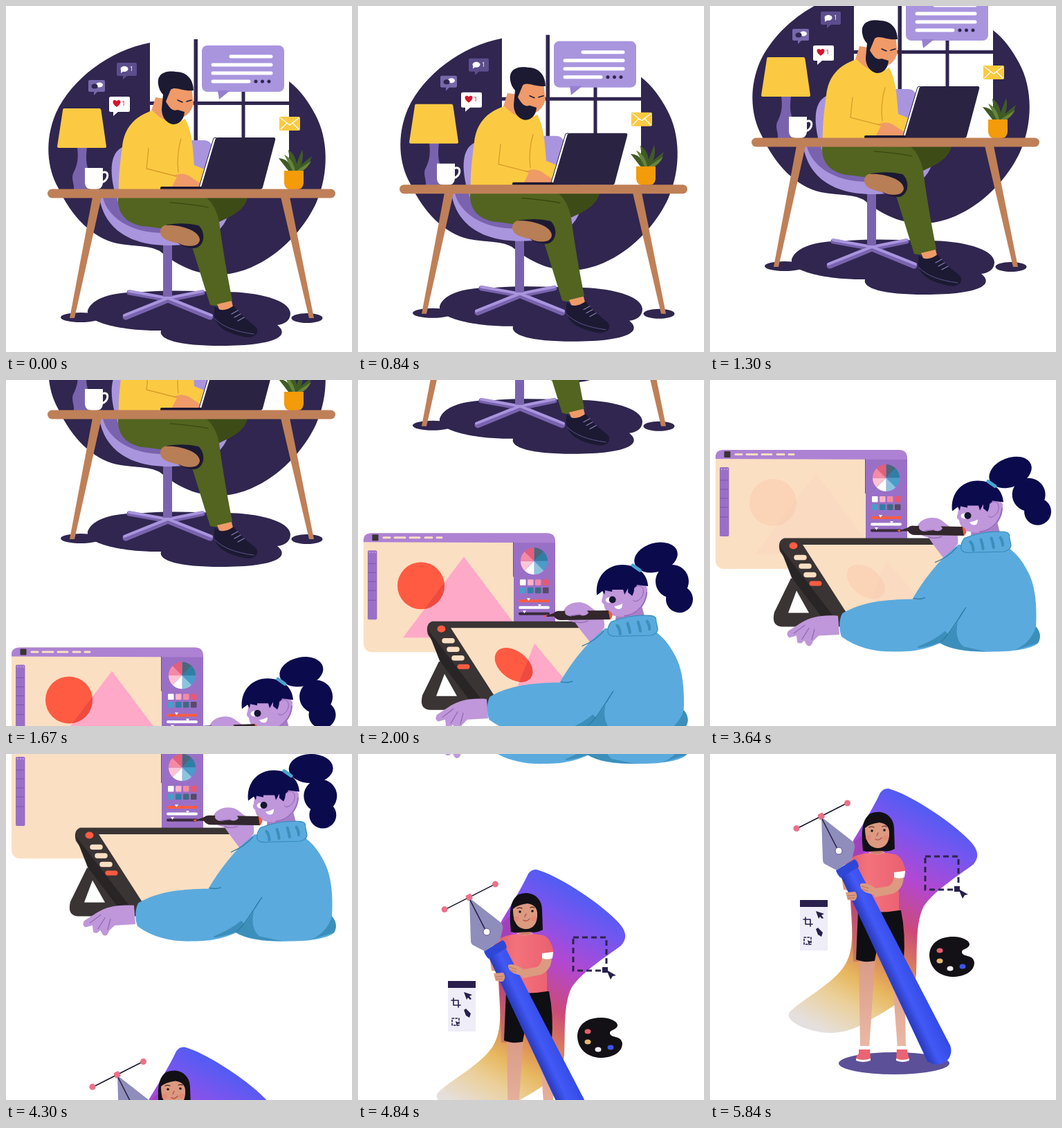
These frames come from a looping animation (500x500 px, 8000 ms). An HTML page:

```html
<!DOCTYPE html>
<html lang="en">
<head>
<meta charset="utf-8">
<title>Creative work</title>
<style>
html, body { margin: 0; width: 100%; height: 100%; overflow: hidden; background: #fff; }
svg { display: block; width: 100vw; height: 100vh; }
text { font: 8.5px Roboto, Arial, sans-serif; }
.ink { fill: #30264f; }
.dark { fill: #1c1933; }
.screen { fill: #2a2342; }
.lilac { fill: #a995de; }
.plum { fill: #7963ae; }
.gold { fill: #fbca42; }
.skin { fill: #ef9a68; }
.wood { fill: #bf8058; }
.pants { fill: #52641f; }
.violet { fill: #bf97da; }
.cream { fill: #fbdfc2; }
.hair { fill: #0b0a4d; }
.knit { fill: #5aaade; }
.coal { fill: #3a3434; }
.red { fill: #ff5b42; }
.pink { fill: #ffa9c8; }
.deep { fill: #281f4d; }
.face { fill: #dc9a80; }
.line { fill: none; stroke-linecap: round; stroke-linejoin: round; }
</style>
</head>
<body>
<svg viewBox="0 0 500 500">
<defs>
  <linearGradient id="sky" gradientUnits="userSpaceOnUse" x1="325" y1="75" x2="150" y2="395">
    <stop offset="0" stop-color="#4a5df4"/><stop offset=".14" stop-color="#7a55ee"/>
    <stop offset=".3" stop-color="#b248d2"/><stop offset=".48" stop-color="#cb4a78"/>
    <stop offset=".64" stop-color="#dc8a55"/><stop offset=".75" stop-color="#e7b85f"/>
    <stop offset=".85" stop-color="#ebcf98"/><stop offset="1" stop-color="#e5e0e0"/>
  </linearGradient>
  <linearGradient id="barrel" gradientUnits="userSpaceOnUse" x1="254" y1="310" x2="288" y2="294">
    <stop offset="0" stop-color="#2c3ec4"/><stop offset=".35" stop-color="#4259f6"/><stop offset="1" stop-color="#3349e6"/>
  </linearGradient>
  <linearGradient id="leg" x2="0" y2="1">
    <stop offset="0" stop-color="#d99a84"/><stop offset="1" stop-color="#eab9a6"/>
  </linearGradient>
  <linearGradient id="shirt">
    <stop offset="0" stop-color="#d9536a"/><stop offset=".4" stop-color="#f4727c"/><stop offset="1" stop-color="#e9606f"/>
  </linearGradient>
  <clipPath id="canvas"><path d="M8 125H225V284H8Z"/></clipPath>
  <clipPath id="tri1"><path d="M153 146L65 263H241Z"/></clipPath>
  <clipPath id="tri2"><path d="M255 265L231 326H306Z"/></clipPath>
</defs>
<g id="roll">

<!-- desk -->
<g>
  <path class="ink" d="M208 53C150 64 95 105 72 155C55 195 60 235 75 262C95 305 125 335 160 343C185 348 205 345 222 354C245 372 270 389 312 388C370 385 425 335 448 285C468 240 465 190 447 157C437 138 425 121 409 109V53Z"/>
  <path fill="#fff" d="M208 20H409V268H208Z"/>
  <path class="ink" d="M271.500 48h5.500v220h-5.500zM340.500 122h5v80h-5zM208 138h201v5h-201z"/>
  <g class="lilac">
    <rect x="283" y="57" width="119" height="67" rx="8"/>
    <path fill="#9680cf" d="M306 122H324L308 135Z"/>
  </g>
  <path class="line" stroke="#fff" stroke-width="5" d="M325 73H383M299 85H383M299 97H383M299 109H351"/>
  <path class="line" stroke="#30264f" stroke-width="5" d="M361 109h0M370.500 109h0M380 109h0"/>
  <g fill="#5c4d8c">
    <path d="M162 82H187Q189 82 189 84V99Q189 101 187 101H175L169 106V101H162Q160 101 160 99V84Q160 82 162 82Z"/>
    <path fill="#7768ab" d="M121 107H141Q143 107 143 109V122Q143 124 141 124H132L127 129V124H121Q119 124 119 122V109Q119 107 121 107Z"/>
  </g>
  <g fill="#fff">
    <ellipse cx="171" cy="91" rx="5.500" ry="4"/><path d="M166 92v5l4-3z"/>
    <ellipse cx="135" cy="114" rx="5" ry="3.500"/>
    <ellipse class="ink" cx="128" cy="116" rx="4.500" ry="3.500"/>
    <text x="179" y="94">1</text>
    <path d="M152 131H177Q179 131 179 133V151Q179 153 177 153H162L155 159V153H151Q149 153 149 151V133Q149 131 152 131Z"/>
  </g>
  <path fill="#d8122c" d="M160 146C150 139 156 133 160 137.500C164 133 170 139 160 146Z"/>
  <text x="167.500" y="144" fill="#d8122c" font-weight="700">1</text>
  <rect class="gold" x="395" y="160" width="30" height="20" rx="2"/>
  <path class="line" stroke="#fff" stroke-width="1.200" d="M397 162L410 172L423 162M397 178L406 169M423 178L414 169"/>

  <path class="plum" d="M103 204H117C115 222 116 230 121 242C124 252 118 258 119 266H98C99 257 94 250 97 242C103 230 105 222 103 204Z"/>
  <path class="gold" d="M84 148H135Q137 148 137.500 151L145 203Q145 205 143 205H76Q74 205 74 203L82 151Q82 148 84 148Z"/>
  <path class="line" stroke="#fff" stroke-width="3" d="M139 241C150 236 149 253 138 255"/>
  <path fill="#fff" d="M114 234H140V256Q139 265 130 265H124Q115 265 114 256Z"/>

  <g class="ink">
    <path d="M118 440C125 420 160 413 190 414C230 410 270 412 310 413C360 412 410 424 411 444C411 455 402 460 392 461C410 475 395 491 310 491C250 491 220 482 224 469C180 470 115 460 118 440Z"/>
    <ellipse cx="108" cy="450" rx="29" ry="7"/><ellipse cx="435" cy="451" rx="22.500" ry="7"/>
  </g>
  <path class="lilac" d="M157 268C150 240 150 213 168 204L260 194H286Q298 194 300 210L322 268Z"/>
  <path class="line" stroke="#7963ae" stroke-width="7" d="M234 424L178 414M236 424L284 414"/>
  <path class="line" stroke="#7963ae" stroke-width="9" d="M234 424L173 449M234 424L295 449"/>
  <path class="line" stroke="#a995de" stroke-width="4" d="M178 412L234 422L284 412M171 447L234 422L297 447"/>
  <path class="plum" d="M227 344H240V420H227Z"/>
  <path class="lilac" d="M135 277C140 310 165 346 235 346C285 346 312 330 322 300L326 277Z"/>
  <path class="plum" d="M140 277C147 305 180 330 235 328L228 320C190 318 165 300 160 277Z"/>

  <path class="skin" d="M216 132L208 158L240 170L236 135Z"/>
  <path class="gold" d="M212 151C186 159 171 176 168 203C164 232 162 255 163 272H286L287 236L272 230C270 200 268 180 259 163C245 172 225 167 212 151Z"/>
  <path class="skin" d="M238 247Q254 239 264 245L282 257V265H228Z"/>
  <path class="gold" d="M190 190C185 215 180 240 195 265H238L247 247L206 236Z"/>
  <path class="line" stroke="#d99a2c" stroke-width="1.300" d="M206 206L203 235L246 246M253 192Q246 215 249 240"/>
  <path class="skin" d="M228 115H268L271 142Q265 160 250 162L229 154Z"/>
  <path class="dark" d="M220 113C218 98 230 93 245 95C262 95 271 107 271 122C255 124 245 115 238 121L231 138C236 147 241 153 248 150L258 153C257 165 250 171 241 171C231 169 225 160 225 149L227 128Q221 122 220 113Z"/>
  <path class="line" stroke="#1c1933" stroke-width="1.500" d="M248 136L255 139M261 138L268 136"/>

  <path fill="#3d4c17" d="M270 277H349C345 294 328 303 308 312Z"/>
  <path class="pants" d="M162 277H290Q304 290 308 312C313 350 320 390 327 425Q312 437 295 432L268 345C255 323 225 321 196 318C173 313 161 300 162 277Z"/>
  <path class="line" stroke="#35420f" stroke-width="1.200" d="M237 284Q275 287 292 291"/>
  <path class="dark" d="M232 316Q258 312 278 317C289 326 288 348 272 350Q255 349 248 342Z"/>
  <path fill="#b87e55" d="M229 317C245 315 278 322 280 337C280 350 258 348 250 343C240 341 222 338 223 325Q224 319 229 317Z"/>
  <path class="skin" d="M305 431L326 426L330 443L310 443Z"/>
  <path class="dark" d="M302 434Q312 445 329 433C339 448 352 455 362 465C367 475 355 481 344 478C320 473 295 463 302 434Z"/>
  <path class="line" stroke="#8b83b5" stroke-width="1.200" d="M326 445l9-5M330 450l9-5M335 455l9-5"/>
  <path class="line" stroke="#5d5588" stroke-width="1" d="M302 452Q318 469 358 474"/>

  <path fill="#fff" stroke="#30264f" d="M304 190L300 191L278 265H290Z"/>
  <path class="screen" d="M307 190H387Q390 190 389 194L371 262Q370 265 367 265H281L302 194Q303 190 307 190Z"/>
  <rect class="dark" x="223" y="261" width="60" height="5" rx="2"/>
  <path fill="#3f5b26" d="M408 238L394 220Q405 220 411 230L408 208Q418 214 420 228L428 207Q431 220 426 230L442 217Q438 232 427 238Z"/>
  <path fill="#67843a" d="M414 238L402 215Q414 220 418 238ZM420 238L441 224Q435 236 426 239Z"/>
  <path fill="#f39b08" d="M402 238H430V256Q429 265 421 265H411Q403 265 402 256Z"/>
  <path class="wood" d="M125 276H138L99 451H92ZM397 276H410L445 451H438Z"/>
  <rect class="wood" x="60" y="264.500" width="416" height="13" rx="6.500"/>
</g>

<!-- tablet artist -->
<g transform="translate(0 500)">
  <g id="monitor">
    <rect class="cream" x="8" y="112" width="277" height="172" rx="12"/>
    <path fill="#9a70c6" d="M225 125H285V272Q285 284 273 284H225Z"/>
    <path fill="#ad82d3" d="M8 125V122Q8 112 20 112H273Q285 112 285 124V126Z"/>
    <path fill="#6d4b96" d="M224 125h1v50h-1z"/>
    <rect class="coal" x="20.500" y="114" width="9" height="9" rx="1"/>
    <path class="line" stroke="#fbdfc2" stroke-width="3" d="M37 118.500h9M53 118.500h15M75 118.500h14M97 118.500h10M114 118.500h7"/>
    <rect fill="#9a70c6" x="14" y="137" width="13.500" height="100" rx="2"/>
    <path class="line" stroke="#c9a7e6" stroke-width="2" stroke-dasharray="0 4" d="M17 140h10"/>
    <path stroke="#7b55a8" d="M15 156h11M15 169h11M15 182h11M15 195h11M15 209h11"/>
    <g class="art" clip-path="url(#canvas)">
      <path class="pink" d="M153 146L65 263H241Z"/>
      <circle class="red" cx="91" cy="188" r="34"/>
      <circle fill="#ee4a40" cx="91" cy="188" r="34" clip-path="url(#tri1)"/>
    </g>
    <g id="wheel" transform="translate(254.500 152.500)"></g>
    <g id="swatches"></g>
    <path class="line" stroke="#ff5b42" stroke-width="4" d="M234 210H275"/>
    <path class="line" stroke="#fff" stroke-width="4" d="M234 219.500H275"/>
    <path class="line" stroke="#3a2a3c" stroke-width="4" d="M234 228.500H275"/>
    <path fill="#fff" d="M244 206h5l-2.500 4zM260 215h5l-2.500 4zM238 224h5l-2.500 4z"/>
  </g>
  <path class="coal" d="M117 291L93 340Q88 360 104 361H192L155 296Z"/>
  <path fill="#fff" d="M125 309L113 341H143Z"/>
  <path class="coal" d="M107 233H350L300 360H180Q168 352 162 340L101 252Q97 237 107 233Z"/>
  <path fill="#292425" d="M100 244L118 290L165 352Q175 362 188 360L180 348Z"/>
  <path class="cream" d="M134 242.500H354L300 345L196 339Z"/>
  <g class="art">
    <path class="pink" d="M255 265L231 326H306Z"/>
    <ellipse class="red" cx="225" cy="296" rx="31" ry="20" transform="rotate(38 225 296)"/>
    <g clip-path="url(#tri2)"><ellipse fill="#ee4a40" cx="225" cy="296" rx="31" ry="20" transform="rotate(38 225 296)"/></g>
  </g>
  <ellipse class="red" cx="120.500" cy="244" rx="6" ry="5"/>
  <path class="line" stroke="#fbdfc2" stroke-width="7.500" d="M125 261H136M132 273.500H143M139 286H150"/>
  <path class="line" stroke="#ff5b42" stroke-width="7" d="M147 298.500H158"/>
  <g id="palm">
    <path class="violet" d="M190 345C165 343 150 348 138 356L118 371Q114 379 120 382L130 379L131 390Q136 395 141 387L145 395Q151 400 154 388L162 379L192 377Z"/>
    <path class="line" stroke="#8d65b0" stroke-width="1.200" d="M142 361L126 375M148 366L138 385M156 368L152 386"/>
  </g>
  <g id="tail" class="hair">
    <ellipse cx="405" cy="139" rx="32" ry="21" transform="rotate(-24 405 139)"/>
    <circle cx="433" cy="170" r="24"/><circle cx="447" cy="194" r="19.500"/>
  </g>
  <g id="head">
    <path fill="#a77fc6" d="M354 222L352 250H400L390 212Z"/>
    <path class="violet" d="M336 188L334 204Q331 210 336 213Q338 230 360 231C384 232 400 214 399 190L392 180Z"/>
    <path class="line" stroke="#9a6dc0" stroke-width="2" d="M366 230C384 228 397 213 398 196"/>
    <path class="hair" d="M326 200C323 174 340 156 363 156C386 156 399 170 400 187L384 185L377 201L371 196V190L366 199L364 192H348V195L338 193L337 199L334 194Z"/>
    <path class="line" stroke="#4aa3cf" stroke-width="5" d="M378 157L388 164"/>
    <path class="violet" stroke="#8d65b0" d="M380 190C390 180 398 193 390 204Q382 212 378 207"/>
    <ellipse fill="#fff" cx="344" cy="207" rx="5.500" ry="4"/><circle fill="#171532" cx="348.500" cy="206.500" r="5"/>
    <path fill="#fff" d="M351 216Q358 215 363 212Q363 221 357 220Q353 220 351 216Z"/>
  </g>
  <g id="hand">
    <path class="violet" d="M285 232C286 220 298 213 311 213.500C321 214 326 222 336 224Q346 228 347 246L332 272L313 253L304 243Q288 242 285 232Z"/>
    <path fill="#32272c" d="M258 240L272 233Q275 229 281 229L350 220.500Q357 224 354 233L284 242Q277 243 273 238Z"/>
    <path class="red" d="M350 220.500Q361 224 354 233.500ZM257 239l5-2v4z"/>
    <path class="violet" d="M288 228Q300 214 313 218L322 227Q318 234 309 231L297 235Q287 235 288 228Z"/>
    <path class="line" stroke="#8d65b0" stroke-width="1.200" d="M297 234L310 231M304 242Q314 244 322 239"/>
  </g>
  <g id="body">
    <path class="knit" d="M350 246C322 268 302 297 288 323C250 323 215 327 188 343C183 352 185 369 189 376C212 392 240 398 270 397C300 397 315 392 332 385C350 395 375 398 410 397C442 397 468 392 474 384C479 375 473 367 469 362C469 330 464 303 453 285C444 269 435 259 422 250Z"/>
    <path fill="#3b8fba" d="M366 335C352 350 350 378 366 390L400 397Q350 396 332 385Q350 368 366 335ZM300 390Q325 380 338 368L346 376Q330 388 300 392ZM469 362Q479 372 473 385L440 395Q463 385 469 362Z"/>
    <path class="line" stroke="#2f7ba5" stroke-width="1.300" d="M332 384C345 372 352 357 366 335M290 322Q300 324 306 321M318 271Q336 264 348 250"/>
    <path class="knit" stroke="#3b8fba" stroke-width="1.300" d="M358 237Q385 226 415 228Q424 229 423 236L426 247Q426 254 416 256L372 257Q354 259 354 250Q353 244 358 237Z"/>
    <path class="line" stroke="#3b8fba" stroke-width="4" d="M367 242Q371 246 372 254M382 239Q385 246 386 252M397 237Q400 244 401 250M410 236Q414 242 414 247"/>
  </g>
</g>

<!-- pen holder -->
<g transform="translate(0 1000)">
  <ellipse fill="#5c5099" cx="266" cy="447" rx="80" ry="16"/>
  <path fill="url(#sky)" d="M258 50C285 57 345 94 374 124C388 138 390 149 380 160C355 178 322 200 309 220C296 245 300 285 298 318C296 350 260 368 225 388C200 403 175 406 150 400C130 395 108 384 115 373C130 357 172 335 190 312C208 290 206 262 204 230C202 190 200 150 207 125C216 110 236 78 246 56Q251 49 258 50Z"/>
  <path fill="#8b2b85" opacity=".3" d="M222 116L208 127Q202 160 205 230L207 300H222Z"/>
  <path fill="url(#leg)" d="M215 292H239L230 425H217ZM261 292H281L283 425H271Z"/>
  <path fill="#0f0e13" d="M214 226H276Q283 260 280 298Q262 303 255 298L245 262L238 299Q222 302 211 297Z"/>
  <g fill="#ea6474">
    <path d="M215 425H231L232 442Q221 447 211 442Q211 436 215 433ZM270 425H284L288 441Q277 446 269 442Z"/>
    <path fill="#fff" d="M215 422h16v5h-16zM269 422h15v5h-15zM211 440q10 4 21 0v3q-11 4-21 0zM269 440q9 4 19 0v3q-10 4-19 0z"/>
  </g>
  <path class="face" d="M190 176L208 176L206 198L193 196Z"/>
  <path fill="url(#shirt)" d="M214 146Q240 139 268 145Q281 151 283 174L266 178L273 200V226Q245 231 214 227V180L190 180Q192 152 214 146Z"/>
  <path class="face" d="M266 177L280 178Q279 196 264 202L238 207L234 195L258 191Q265 187 266 177Z"/>
  <path fill="#fff" d="M266 171l16-2-1 9q-8 3-15 0zM229 142h24q-12 5-24 0z"/>
  <path fill="#c87f69" d="M232 128H250V143Q241 146 232 143Z"/>
  <path fill="#121015" d="M221 140C219 115 218 95 232 86C250 79 266 90 266 108L267 137Q258 142 250 140L226 141Z"/>
  <path class="face" d="M224 107Q230 101 245 99Q258 101 259 112C260 128 253 136 242 136C230 135 224 126 224 107Z"/>
  <circle fill="#ea8075" opacity=".6" cx="229" cy="121" r="4"/><circle fill="#ea8075" opacity=".6" cx="254" cy="121" r="4"/>
  <g fill="#221719"><circle cx="234" cy="111" r="1.800"/><circle cx="252" cy="110" r="1.800"/></g>
  <path class="line" stroke="#4a2a25" stroke-width="1.200" d="M230 106q4-2 7 0M249 105q4-2 6 0"/>
  <path class="line" stroke="#b8514d" stroke-width="1.400" d="M239 123q5 3 9-2M243 114l-2 4"/>

  <path fill="url(#barrel)" d="M189 177L213 163L347 421C354 441 333 457 314 444Z"/>
  <path fill="#2f47d6" d="M182 168L209 152Q214 155 215 163L189 179Q184 175 182 168Z"/>
  <path fill="#8f8dbc" d="M161 91L207 127Q210 131 209 136L205 153L183 168L166 159Q163 157 163 153Z"/>
  <path class="line" stroke="#231d3c" stroke-width="1.500" d="M162 94L184 137"/>
  <circle fill="#fff" stroke="#5f5b8b" cx="186" cy="140" r="5"/>
  <path class="face" d="M217 188Q225 184 239 194L242 205L225 200Q216 195 217 188ZM196 200L210 199Q215 207 209 212L199 211Z"/>
  <path class="line" stroke="#b87560" d="M219 191l10 3M219 195l9 3M199 205l11-1M199 208l10 0"/>

  <path stroke="#171425" stroke-width="1.500" d="M125 108L198 71"/>
  <g fill="#e9728a"><circle cx="125" cy="107.500" r="4.500"/><circle cx="198.500" cy="71" r="4.500"/><rect x="156.500" y="85.500" width="8.500" height="8.500" rx="2" transform="rotate(-25 161 90)"/></g>
  <path fill="none" stroke="#2b244b" stroke-width="3" stroke-dasharray="8 5" d="M311 148H359V196H311Z"/>
  <path class="deep" d="M353 191h8v8h-8zM359 195l14 8-5 1-3 5z"/>
  <path fill="#efedf7" d="M130 211h40v73h-40z"/>
  <path class="deep" d="M130 211h40v10h-40zM153 227l12 4-4 2 3 4-2 1-3-3-2 3zM153 253l3-2 7 7-2 6-5-3z"/>
  <path class="line" stroke="#281f4d" stroke-width="1.600" d="M138 236V246H148M135 239H145V249"/>
  <path class="line" stroke="#281f4d" stroke-width="1.600" stroke-dasharray="2.500 2.500" d="M136 265h10v10h-10z"/>
  <path class="deep" d="M141 269l6 3-3 1-1 4z"/>
  <path fill="#131116" d="M351 264C365 264 376 270 375 276C372 283 363 281 364 287C366 294 380 289 382 301C382 315 367 322 350 322C330 321 317 308 317 290C318 273 332 264 351 264Z"/>
  <g><ellipse fill="#e3606c" cx="332" cy="284" rx="4.500" ry="3.500"/><ellipse fill="#e4b972" cx="332" cy="299" rx="4.500" ry="3.500"/><ellipse fill="#f3f1f4" cx="347" cy="310" rx="4.500" ry="3.500"/><ellipse fill="#3d55ea" cx="365" cy="307" rx="4.500" ry="3.500"/></g>
</g>
</g>
</svg>
<script>
const $ = id => document.getElementById(id);
const LOOP = 8000, FPS = 30, PAGE = 500, SCROLL = 2500;

const shades = ['#47687f', '#2f7fa5', '#4a9cc9', '#8cc4e0', '#fff', '#ffc3d3', '#f58aa5', '#e25f7d'];
$('wheel').innerHTML = shades.map((c, i) =>
  `<path fill="${c}" transform="rotate(${i * 45})" d="M0 0V-19.500A19.500 19.500 0 0 1 13.800-13.800Z"/>`).join('');
const chips = ['#fff', '#ffb3c4', '#f58aa5', '#f0566b', '#4a9cc9', '#2f7fa5', '#3f6a80', '#584a68'];
$('swatches').innerHTML = chips.map((c, i) =>
  `<rect fill="${c}" x="${234 + i % 4 * 11}" y="${179 + (i >> 2) * 11.5}" width="8.500" height="8.500" rx="1"/>`).join('');

const clamp = x => Math.min(1, Math.max(0, x));
const cubic = p => p < .5 ? 4 * p ** 3 : 1 - 4 * (1 - p) ** 3;
const scroll = (t, start) => PAGE * cubic(clamp((t - start) / SCROLL));

// Cosine-eased value from [time, value] pairs
function track(t, keys) {
  const i = keys.findIndex(k => k[0] > t);
  if (i === 0) return keys[0][1];
  if (i < 0) return keys[keys.length - 1][1];
  const [t0, a] = keys[i - 1], [t1, b] = keys[i];
  return a + (b - a) * (1 - Math.cos(Math.PI * (t - t0) / (t1 - t0))) / 2;
}
const LEAN = [[1400, .5], [2000, .8], [2300, 1], [2800, 0], [3450, 1]];
const SWING = [[1400, 14], [2000, 8], [2300, 0], [3450, 0], [4300, 23]];
const FLOAT = [[1500, -4], [2000, -6.5], [2800, 0], [3500, -6.5]];
const ART = [[3350, 1], [3700, 0]];
const art = document.querySelectorAll('.art');
const move = (id, value) => $(id).setAttribute('transform', value);

function draw(t) {
  const k = track(t, LEAN);
  move('roll', `translate(0 ${-scroll(t, 467) - scroll(t, 3304)})`);
  move('monitor', `translate(0 ${track(t, FLOAT)})`);
  move('head', `translate(${24 * k} ${-6 * k})`);
  move('tail', `translate(${28 * k} ${-2 * k}) rotate(${track(t, SWING)} 383 163)`);
  move('hand', `translate(${13 * k} ${-9 * k}) rotate(${8 * k} 315 235)`);
  move('palm', `matrix(1 0 0 ${1 - .15 * k} ${-5 * k} ${52 * k})`);
  move('body', `matrix(1 0 ${-.06 * k} ${1 + .024 * k} ${23.8 * k} ${-9.5 * k})`);
  for (const g of art) g.setAttribute('opacity', track(t, ART));
}

const begin = performance.now();
function tick() {
  const t = (performance.now() - begin) % LOOP;
  draw(Math.floor(t * FPS / 1000 + 1e-6) * 1000 / FPS);
  requestAnimationFrame(tick);
}
tick();
</script>
</body>
</html>
```
